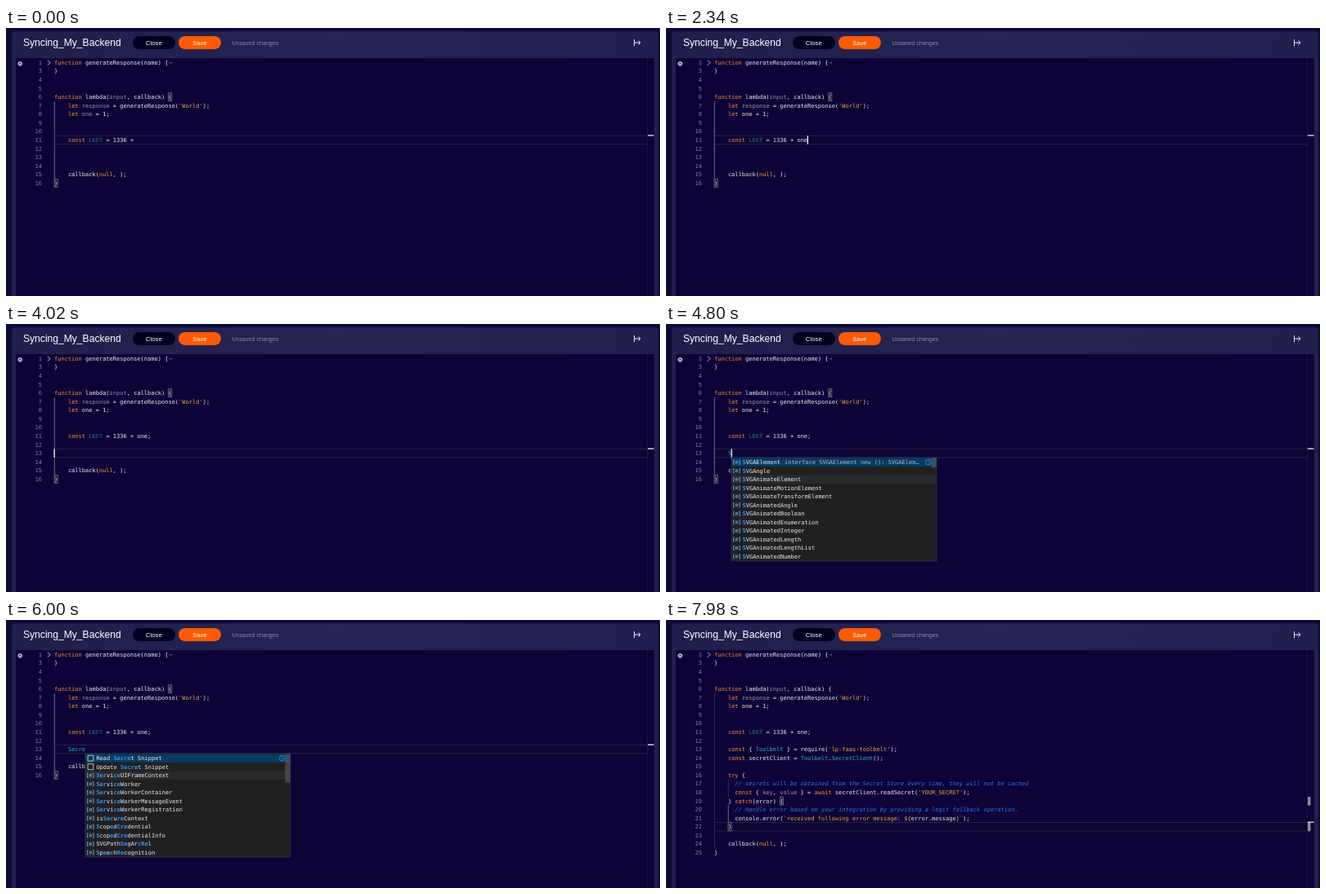
An HTML page for the animation above (8 s loop, 800 by 329 pixels).

```html
<!DOCTYPE html>
<html lang="en">
<head>
<meta charset="utf-8">
<title>Code editor</title>
<style>
  html, body { margin: 0; width: 100%; height: 100%; overflow: hidden; background: #0b0a38; }
  svg { display: block; }
  text { white-space: pre; fill: #ecebf0; }
  .code text { font: 7.03px "DejaVu Sans Mono", monospace; }
  .ui text { font-family: "Liberation Sans", Arial, sans-serif; fill: #fff; }
  .code .num { fill: #85839a; text-anchor: end; }
  .kw { fill: #fb922b; }
  .str { fill: #f0a04b; }
  .type { fill: #2fb5bd; }
  .leet { fill: #2c7285; }
  .dim { fill: #9694a8; }
  .note { fill: #2478f2; font-style: italic; }
  .hit { fill: #2f96f0; font-weight: bold; }
  .code .info { fill: #a9bccb; }
  .line { fill: none; stroke-width: .9; }
</style>
</head>
<body>
<svg width="800" height="329" viewBox="0 0 800 329">
  <defs>
    <linearGradient id="bar" x1="0" y1="0" x2="1" y2="0">
      <stop offset="0" stop-color="#201e4c"/>
      <stop offset=".5" stop-color="#262452"/>
      <stop offset="1" stop-color="#211f4e"/>
    </linearGradient>
  </defs>
  <path d="M7 329V8q0-4 4-4H794q4 0 4 4V329z" fill="url(#bar)"/>
  <rect x="12" y="37" width="781" height="292" fill="#0d0338"/>
  <path d="M784.5 37V329" stroke="#1a1245"/>
  <g class="ui">
    <text x="21" y="21.6" font-size="12.1">Syncing_My_Backend</text>
    <rect x="155" y="10" width="52" height="16" rx="8" fill="#04001f"/>
    <text x="180.8" y="20.6" font-size="7.8" text-anchor="middle">Close</text>
    <rect x="211" y="10" width="52" height="16" rx="8" fill="#fd5b03"/>
    <text x="236.8" y="20.6" font-size="7.6" text-anchor="middle">Save</text>
    <text x="276.5" y="20.6" font-size="7.1" style="fill:#8b899f">Unsaved changes</text>
    <path class="line" stroke="#fff" d="M768.5 14v8M769 18h7M773.5 15.5l2.5 2.5l-2.5 2.5"/>
  </g>
  <circle cx="17.3" cy="43.8" r="1.7" fill="none" stroke="#d9d8e2" stroke-width="1.3"/>
  <circle cx="17.3" cy="43.8" r="2.7" fill="none" stroke="#d9d8e2" stroke-width=".8" stroke-dasharray="1.1 1.02"/>
  <path class="line" stroke="#e4e3ea" d="M51 39.6l3 3l-3 3"/>
  <g id="doc" class="code"></g>
  <rect id="caret" width="1.2" height="10.5" fill="#fff"/>
  <g id="menu" class="code"></g>
</svg>
<script>
const LOOP = 8000, LEFT = 59, CH = 4.232, ROW = 10.57, ITEM = 10.53, BLINK = 500;
const $ = id => document.getElementById(id);
const colX = c => LEFT + c * CH;
const midY = r => 42.4 + r * ROW;

const HEAD = `function generateResponse(name) {
}


function lambda(input, callback) {
    let response = generateResponse('World');
    let one = 1;

`.split('\n');
const TAIL = ['', '    callback(null, );', '}'];
const SNIPPET = `    const { Toolbelt } = require('lp-faas-toolbelt');
    const secretClient = Toolbelt.SecretClient();

    try {
      // secrets will be obtained from the Secret Store every time, they will not be cached
      const { key, value } = await secretClient.readSecret('YOUR_SECRET');
    } catch(error) {
      // Handle error based on your integration by providing a legit fallback operation.
      console.error(\`received following error message: \${error.message}\`);
    }`;

// Kinds: v variable, c constant, f function, s snippet
const LISTS = {
  all: {
    info: 'const LEET: any', thumb: 11,
    items: 'v LEET,c arguments,v callback,f generateResponse,v input,f lambda,v one,v response,c AbortController,c AbortSignal,c AbstractRange,c ActiveXObject'
  },
  on: {
    info: 'let one: number', thumb: 20,
    items: 'v one,c onabort,c onafterprint,c onbeforeprint,c onblur,c oncancel,c onchange,c onclick,c onclose,c oncontextmenu,c oncuechange,c ondblclick'
  },
  svg: {
    info: 'interface SVGAElement new (): SVGAElem…', thumb: 12,
    items: 'c SVGAElement,c SVGAngle,c SVGAnimateElement,c SVGAnimateMotionElement,c SVGAnimateTransformElement,c SVGAnimatedAngle,c SVGAnimatedBoolean,c SVGAnimatedEnumeration,c SVGAnimatedInteger,c SVGAnimatedLength,c SVGAnimatedLengthList,c SVGAnimatedNumber'
  },
  secret: {
    info: '', thumb: 35,
    items: 's Read Secret Snippet,s Update Secret Snippet,c ServiceUIFrameContext,c ServiceWorker,c ServiceWorkerContainer,c ServiceWorkerMessageEvent,c ServiceWorkerRegistration,c isSecureContext,c ScopedCredential,c ScopedCredentialInfo,c SVGPathSegArcRel,c SpeechRecognition'
  }
};

// [time of key press, caret row, text after "1336 + ", text on line 13, menu, query]
const STEPS = [
  [-600, 9, '', ''],
  [1000, 9, '', '', 'all', ''],
  [1740, 9, 'o', '', 'on', 'o'],
  [2000, 9, 'on', '', 'on', 'on'],
  [2160, 9, 'one', '', 'on', 'one'],
  [2340, 9, 'one', ''],
  [3360, 9, 'one;', ''],
  [3780, 10, 'one;', ''],
  [4020, 11, 'one;', ''],
  [4260, 11, 'one;', '    '],
  [4680, 11, 'one;', '    S', 'svg', 'S'],
  [4860, 11, 'one;', '    Se', 'secret', 'Se'],
  [4980, 11, 'one;', '    Sec', 'secret', 'Sec'],
  [5100, 11, 'one;', '    Secr', 'secret', 'Secr'],
  [5220, 11, 'one;', '    Secre', 'secret', 'Secre'],
  [7440, 20, 'one;', SNIPPET]
];

const TOKENS = [
  ['note', /\/\/.*/], ['str', /'[^']*'|`[^$`]*\$\{|\}`/],
  ['kw', /\b(?:function|const|let|try|catch|await|null)\b/],
  ['leet', /\bLEET\b/], ['type', /\b[A-Z]\w*/],
  ['dim', /\b(?:input|response|key|value)\b/]
];
const TOKEN_RE = new RegExp(TOKENS.map(([, re]) => `(${re.source})`).join('|'), 'g');
const span = (cls, s) => `<tspan class="${cls}">${s}</tspan>`;
const paint = s => s.replace(TOKEN_RE, (m, ...g) => span(TOKENS[g.findIndex(x => x !== undefined)][0], m));
const text = (x, mid, body, cls = '') => `<text x="${x}" y="${mid + 2.5}" class="${cls}">${body}</text>`;
const rect = (x, y, w, h, attrs) => `<rect x="${x}" y="${y}" width="${w}" height="${h}" ${attrs}/>`;
const guide = (col, from, to, color) =>
  `<path d="M${colX(col) + .3} ${midY(from) - 5.3}V${midY(to) + 5.3}" stroke="${color}" stroke-width=".9"/>`;

function drawDoc([, row, sum, body]) {
  const done = body === SNIPPET;
  const lines = [...HEAD, '    const LEET = 1336 + ' + sum, '', ...body.split('\n'), ...TAIL];
  const top = midY(row) - 5.3;
  let out = `<path class="line" stroke="#292b31" d="M${LEFT} ${top}H784M${LEFT} ${top + 10.5}H784"/>`;
  out += guide(0, 5, lines.length - 2, done ? '#3b3759' : '#77758c');
  if (done) {
    out += guide(4, 15, 16, '#3b3759') + guide(4, 18, 19, '#77758c');
    for (const r of [17, 20]) out += rect(785, midY(r) - 5, 3.5, 10.5, 'fill="#8d8c98"');
  }
  out += rect(785, top - 1, 7.5, 1.4, 'fill="#dddce4"');
  const pair = done ? [[17, 19], [20, 4]] : [[4, 33], [lines.length - 1, 0]];
  for (const [r, c] of pair)
    out += rect(colX(c), midY(r) - 5, 4.2, 10, 'fill="#0c1730" stroke="#85838f" stroke-width=".7"');
  lines.forEach((s, i) => {
    out += text(44, midY(i), i ? i + 2 : 1, 'num');
    let html = paint(s);
    if (i === 6 && !sum) html = html.replace('one', span('dim', 'one'));
    out += text(LEFT, midY(i), html);
  });
  return out + text(colX(33) + .6, midY(0), '⋯', 'dim');
}

function icon(kind, x, y) {
  const [color, d] = {
    v: ['#d0d0d0', 'M-3.5 3.5L.3 -.3M-2.6 4L1 .8M3.2 -2.2A2.3 2.3 0 1 1 1 -3.7L.8 -1.6L1.8 -.9z'],
    c: ['#5fa8e4', 'M-2.5 -2.6H-3.8V2.6H-2.5M2.5 -2.6H3.8V2.6H2.5M-1.5 0a1.5 1.5 0 1 0 3 0a1.5 1.5 0 1 0 -3 0M-1.3 1.3L1.3 -1.3'],
    f: ['#b180d7', 'M0 -3.7L3.3 -2V2L0 3.7L-3.3 2V-2zM-3.3 -2L0 -.3L3.3 -2M0 -.3V3.7'],
    s: ['#d0d0d0', 'M-3.3 -3.5H3.5V3.5H-3.3z']
  }[kind];
  return `<path class="line" transform="translate(${x} ${y})" stroke="${color}" d="${d}"/>`;
}

// Marks the letters of the query inside a name; null if they do not all occur.
function mark(name, query) {
  // Fuzzy search also accepts two swapped letters.
  if (name.startsWith('Ser')) query = query.replace('cr', 'rc');
  let from = Math.max(name.indexOf(query.slice(0, 2)), 0);
  if (!from && query) from = Math.max(name.indexOf(query[0]), 0);
  let out = name.slice(0, from), k = 0;
  for (const ch of name.slice(from)) {
    const hit = k < query.length && ch.toLowerCase() === query[k].toLowerCase();
    out += hit ? span('hit', ch) : ch;
    k += hit;
  }
  return k === query.length ? out : null;
}

function drawMenu(x, row, key, query) {
  if (!key) return '';
  const { info, thumb, items } = LISTS[key];
  const rows = items.split(',').map(s => [s[0], mark(s.slice(2), query)]).filter(r => r[1] !== null);
  const y = midY(row) + 5.3, w = 251, mid = i => y + 5.7 + i * ITEM;
  const band = (i, color) => rect(x, mid(i) - 5.3, w, ITEM, `fill="${color}"`);
  let out = rect(x, y, w, rows.length * ITEM + .6, 'fill="#202022" stroke="#35353f" stroke-width=".7"');
  out += band(0, '#083a62');
  const hover = rows.findIndex((_, i) => Math.abs(mid(i) - 190.5) < 5);
  if (hover > 0) out += band(hover, '#2a2a2d');
  rows.forEach(([kind, html], i) => {
    out += icon(kind, x + 6.5, mid(i)) + text(x + 13.5, mid(i), html);
  });
  const infoX = key === 'svg' ? x + 65 : x + 234 - info.length * CH;
  out += text(infoX, mid(0), info, 'info');
  out += `<path class="line" stroke="#3f8ccb" stroke-width=".7" d="M${x + 237.5} ${mid(0)}a3.3 3.3 0 1 0 6.6 0a3.3 3.3 0 1 0 -6.6 0m3.3 -.6v2.3m0 -4.1v.8"/>`;
  return out + rect(x + w - 6.5, y + .4, 6.5, thumb, 'fill="#67676b" fill-opacity=".5"');
}

let shown = null;
function frame() {
  const t = performance.now() % LOOP;
  const step = STEPS.findLast(s => s[0] <= t);
  const [start, row, sum, body, menu, query] = step;
  if (step !== shown) {
    shown = step;
    const col = row === 9 ? 24 + sum.length : row === 10 ? 0 : body.split('\n').pop().length;
    $('doc').innerHTML = drawDoc(step);
    $('menu').innerHTML = drawMenu(colX(col) - .2, row, menu, query);
    $('caret').setAttribute('x', colX(col) - .5);
    $('caret').setAttribute('y', midY(row) - 5.3);
  }
  $('caret').style.opacity = Math.floor((t - start) / BLINK) % 2 ? 0 : 1;
  requestAnimationFrame(frame);
}
frame();
</script>
</body>
</html>
```
